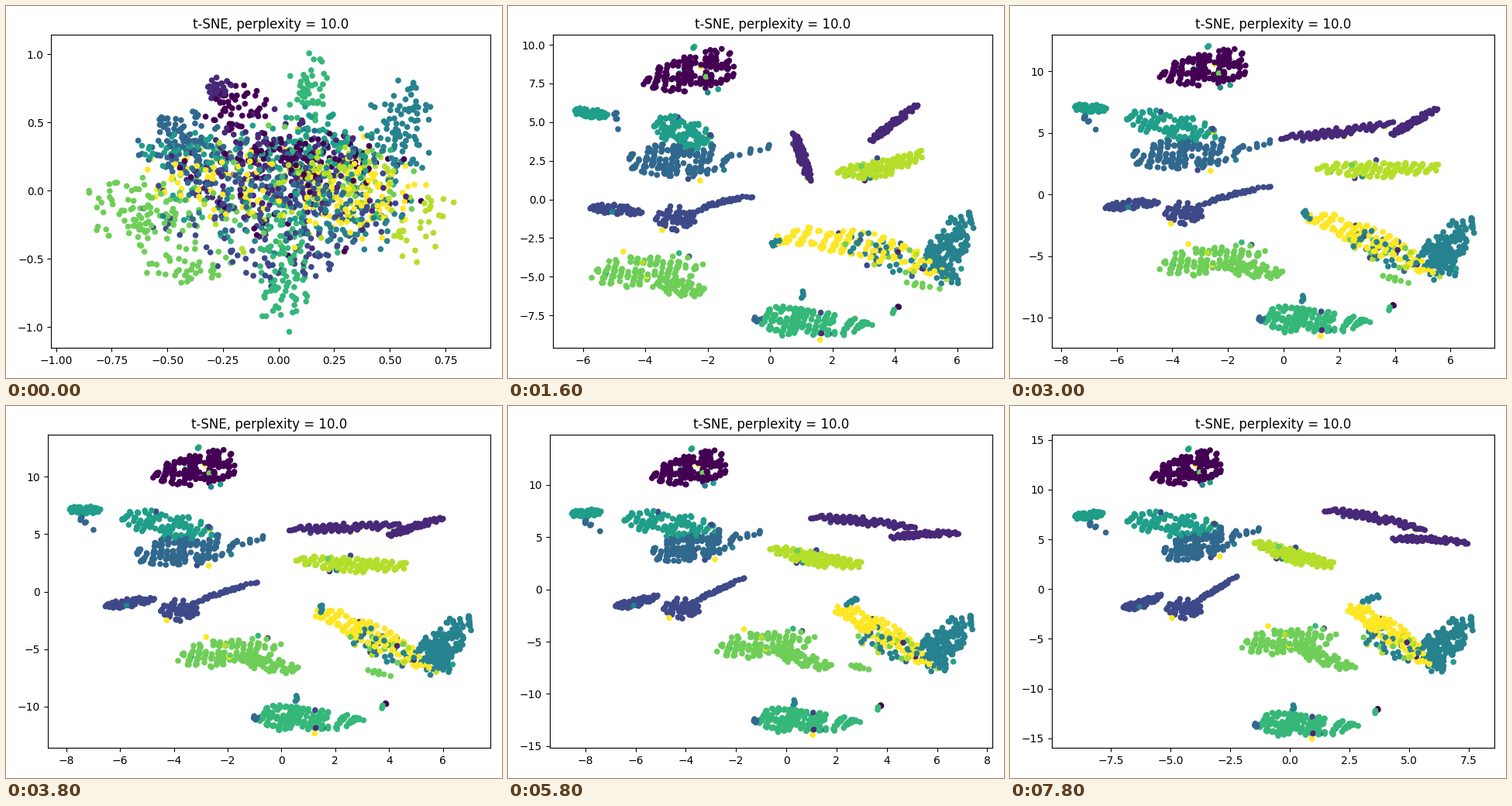
Animation, 640 px wide and 480 px high, one loop 8000 ms. Source, as a matplotlib script:

```python
import numpy as np
import matplotlib.pyplot as plt
from matplotlib.animation import FuncAnimation

FRAMES, STEP = 40, 200
BURST = 8            # steps the first fast spreading takes
ASPECT = 2.3         # stage pixels per x unit over pixels per y unit
POSES = (0, BURST, 15, 39)
THICKEN = (0.8, 0.9, 1.0)
rng = np.random.default_rng(7)

# View (x0, x1, y0, y1) at a few steps
VIEW_STEPS = (0, BURST, 15, 23, 39)
VIEWS = np.array([
    (-1.022, 0.952, -1.153, 1.142),
    (-6.957, 7.13, -9.61, 10.64),
    (-8.33, 7.58, -12.45, 12.95),
    (-8.975, 7.92, -14.55, 14.2),
    (-9.97, 8.57, -15.97, 15.5),
])

labels, tracks = [], []


def clock(t):
    """Fast burst first, then logarithmic drift."""
    if t <= BURST:
        return (1 - np.exp(-t / 4.5)) / (1 - np.exp(-BURST / 4.5))
    return 1 + np.log(t / BURST)


def tween(values, steps, t):
    ticks = [clock(s) for s in steps]
    pos = np.interp(clock(t), ticks, np.arange(len(steps)))
    k = min(int(pos), len(steps) - 2)
    return values[k] + (pos - k) * (values[k + 1] - values[k])


def profile(u, lean):
    """Lens outline on 0..1 whose thickest place is at lean."""
    return (u / lean) ** lean * ((1 - u) / (1 - lean)) ** (1 - lean)


def fill(n, lean):
    """Even places (along, across) in a lens, thinned out along waves."""
    m = int(1.5 * n) + 1
    i = np.arange(m) + rng.integers(1000)
    grid = np.linspace(0, 1, 200)
    cum = np.cumsum(profile(grid, lean))
    u = np.interp((i * 0.7549) % 1, cum / cum[-1], grid)
    v = 2 * ((i * 0.5698) % 1) - 1 + rng.normal(0, 0.08, m)
    p, q = rng.uniform(0, 6, 2)
    wave = np.sin(17 * u + 2 * v + p) * np.cos(4 * v - 7 * u + q)
    best = np.argsort(wave + rng.normal(0, 0.35, m))[-n:]
    return u[best], v[best]


def bow(arc, u, off):
    """Points beside a bowed line (xa, ya, xb, yb, bend)."""
    xa, ya, xb, yb, bend = arc
    x = xa + u * (xb - xa)
    y = ya + u * (yb - ya) + 4 * bend * u * (1 - u)
    tx = ASPECT * (xb - xa)
    ty = yb - ya + 4 * bend * (1 - 2 * u)
    size = np.hypot(tx, ty)
    return np.column_stack([x - off * ty / size / ASPECT, y + off * tx / size])


def band(digit, n, thick, *arcs, lean=0.5):
    """A lens of points along a line that moves from arc to arc."""
    arcs = [np.array((*a, 0)[:5], float) for a in arcs]
    if len(arcs) == 2:
        part = (clock(POSES[2]) - 1) / (clock(POSES[3]) - 1)
        arcs.insert(1, arcs[0] + part * (arcs[1] - arcs[0]))
    u, v = fill(n, lean)
    kind = np.full(n, digit)
    if thick > 0.3:
        stray = rng.random(n) < 0.035
        kind[stray] = rng.integers(1, 10, stray.sum())
        v[stray] *= 1.5
    off = v * thick * profile(u, lean)
    labels.extend(kind)
    tracks.append([bow(a, u, g * off) for a, g in zip(arcs, THICKEN)])


band(0, 180, 1.5, (-4.2, 7.5, -1.15, 8.8), (-4.6, 9.6, -1.35, 10.7),
     (-5.9, 11.2, -2.9, 12.8), lean=0.7)

band(1, 110, 0.36, (0.75, 4.4, 1.3, 1.15), (-0.2, 4.6, 4, 5.85, -0.2),
     (1.35, 7.95, 5.7, 5.85, 0.3))
band(1, 72, 0.28, (3.1, 3.6, 4.75, 6.15), (3.75, 4.7, 5.55, 7),
     (4.05, 5, 7.5, 4.6, 0.2))

band(2, 62, 0.36, (-5.85, -0.55, -4.1, -0.8), (-6.5, -1.1, -4.5, -0.6),
     (-7.05, -1.8, -5.4, -0.5, -0.4))
band(2, 60, 0.9, (-3.7, -1.2, -2.4, -1.3), (-5.2, -1.9, -3.7, -2.1))
band(2, 40, 0.15, (-2.55, -0.95, -0.55, 0.15, 0.25),
     (-3.15, -1, -0.45, 0.65, 0.2), (-4.1, -1.5, -2.2, 1.3))

band(3, 170, 1.35, (-4.6, 2.4, -1.2, 2.75), (-5.5, 2.9, -1.4, 3.8),
     (-5.3, 3.4, -2.2, 5.7))
band(3, 8, 0.3, (-1.2, 2.7, 0.2, 3.6), (-1.4, 3.5, -0.3, 4.5),
     (-2.3, 5.2, -1.1, 6.2))
band(3, 6, 0.2, (-5, 5.9, -4.8, 4.3), (-7.3, 6.6, -6.6, 5.1),
     (-8.6, 6.8, -7.5, 5.6))

band(4, 125, 1.5, (6.5, -0.8, 5.1, -4.9), (6.9, -1.9, 5, -6.2),
     (7.75, -2.8, 5.5, -7.4), lean=0.65)
band(4, 36, 0.5, (5, -3.4, 6.05, -5.4), (5.9, -5, 6.4, -8.3))
band(4, 9, 0.2, (0, -2.95, 0.35, -2.6), (0.7, -1.2, 1, -2.1),
     (3.9, -0.6, 2.9, -1.4))

band(5, 52, 0.36, (-6.35, 5.75, -5.15, 5.4), (-7.6, 7.1, -6.3, 6.9),
     (-9.1, 7.25, -7.75, 7.6))
band(5, 118, 1.15, (-3.75, 4.9, -1.85, 3.7), (-5.7, 6.3, -2.4, 4.8),
     (-6.9, 7, -2.95, 6))

band(6, 180, 1.15, (-0.3, -7.7, 3.35, -8.25), (-1.3, -13.4, 2.95, -13.9),
     lean=0.3)
band(6, 3, 0.1, (3.85, -7.4, 4.05, -7.1), (3.5, -12.5, 3.65, -12.2))
band(0, 2, 0.1, (4.1, -7, 4.1, -6.9), (3.65, -12.1, 3.7, -12))
band(4, 4, 0.1, (1, -6.4, 1.1, -5.8), (0.1, -12.2, 0.2, -11.5))
band(3, 6, 0.2, (-0.6, -7.7, -0.2, -7.8), (-1.55, -13.6, -1.2, -13.7))

band(7, 130, 1.2, (-5.9, -4.9, -2.1, -4.4), (-4.65, -5.9, -0.6, -4.8),
     (-2.2, -5.7, 2, -4.8))
band(7, 46, 0.65, (-3.8, -5.5, -2.05, -5.9), (-2.4, -5.8, 0.05, -6.4),
     (0, -5.9, 2.7, -7.9))
band(7, 8, 0.2, (4.3, -5.3, 5.45, -5.8), (3.5, -6.5, 4.5, -7.2),
     (2.1, -7.5, 2.75, -7.9))

band(8, 145, 0.65, (2.1, 1.8, 5, 3.1, -0.45), (1.1, 2.15, 5.75, 2.25, -0.2),
     (-1.55, 4.8, 1.95, 2.4, -0.3))

band(9, 170, 1.05, (0.1, -2.6, 5.7, -4.95, 0.9), (0.8, -1.8, 5.4, -6.5, 0.6),
     (2.4, -1.8, 5.85, -7.7, 0.6))
for digit, n in ((4, 24), (8, 7), (3, 6), (7, 6)):
    band(digit, n, 1.3, (2.3, -2.6, 5.2, -4.5), (2.3, -3.3, 5, -5.8),
         (3, -4.5, 5.6, -6.6))

# Where each digit lies in the first pile: main and side blob (x, y, sx, sy)
HOMES = (
    ((0.12, 0.25, 0.22, 0.09), (-0.18, 0.62, 0.08, 0.1)),
    ((-0.05, 0.2, 0.22, 0.2), (-0.27, 0.75, 0.03, 0.05)),
    ((-0.1, -0.2, 0.25, 0.2), (0, -0.55, 0.13, 0.08)),
    ((-0.43, 0.33, 0.1, 0.13), (-0.2, 0.15, 0.15, 0.15)),
    ((0.55, 0.45, 0.08, 0.2), (0.2, -0.25, 0.2, 0.12)),
    ((0.1, 0.3, 0.18, 0.16), (-0.4, 0.3, 0.17, 0.07)),
    ((0.02, -0.55, 0.07, 0.24), (0.12, 0.75, 0.06, 0.14)),
    ((-0.62, -0.17, 0.14, 0.14), (-0.42, -0.54, 0.1, 0.1)),
    ((0.28, 0.1, 0.15, 0.1), (0.64, -0.25, 0.1, 0.14)),
    ((0.35, -0.05, 0.17, 0.16), (-0.3, 0.1, 0.16, 0.12)),
)
ANYWHERE = (0.05, 0, 0.3, 0.25)


def home(digit):
    main, side = HOMES[digit]
    x, y, sx, sy = (main, main, side, ANYWHERE)[rng.integers(4)]
    r = np.sqrt(-2 * np.log(1 - 0.88 * rng.random()))
    a = rng.uniform(0, 2 * np.pi)
    return x + sx * r * np.cos(a), y + sy * r * np.sin(a)


pile = np.array([[home(d) for d in labels]])
places = np.concatenate([pile, np.concatenate(tracks, axis=1)])
order = rng.permutation(len(labels))
labels, places = np.array(labels)[order], places[:, order]

fig, ax = plt.subplots(figsize=(6.4, 4.8), dpi=100)
cloud = ax.scatter(*places[0].T, c=labels, s=20, cmap="viridis", vmin=0, vmax=9)
ax.set_title("t-SNE, perplexity = 10.0")


def update(t):
    x0, x1, y0, y1 = tween(VIEWS, VIEW_STEPS, t)
    cloud.set_offsets(tween(places, POSES, t))
    ax.set_xlim(x0, x1)
    ax.set_ylim(y0, y1)
    fig.subplots_adjust(left=0.09, right=0.976, bottom=0.081, top=0.922)
    fig.tight_layout()
    return (cloud,)


anim = FuncAnimation(fig, update, frames=FRAMES, interval=STEP,
                     init_func=lambda: update(0), repeat=True, repeat_delay=0)
plt.show()
```
